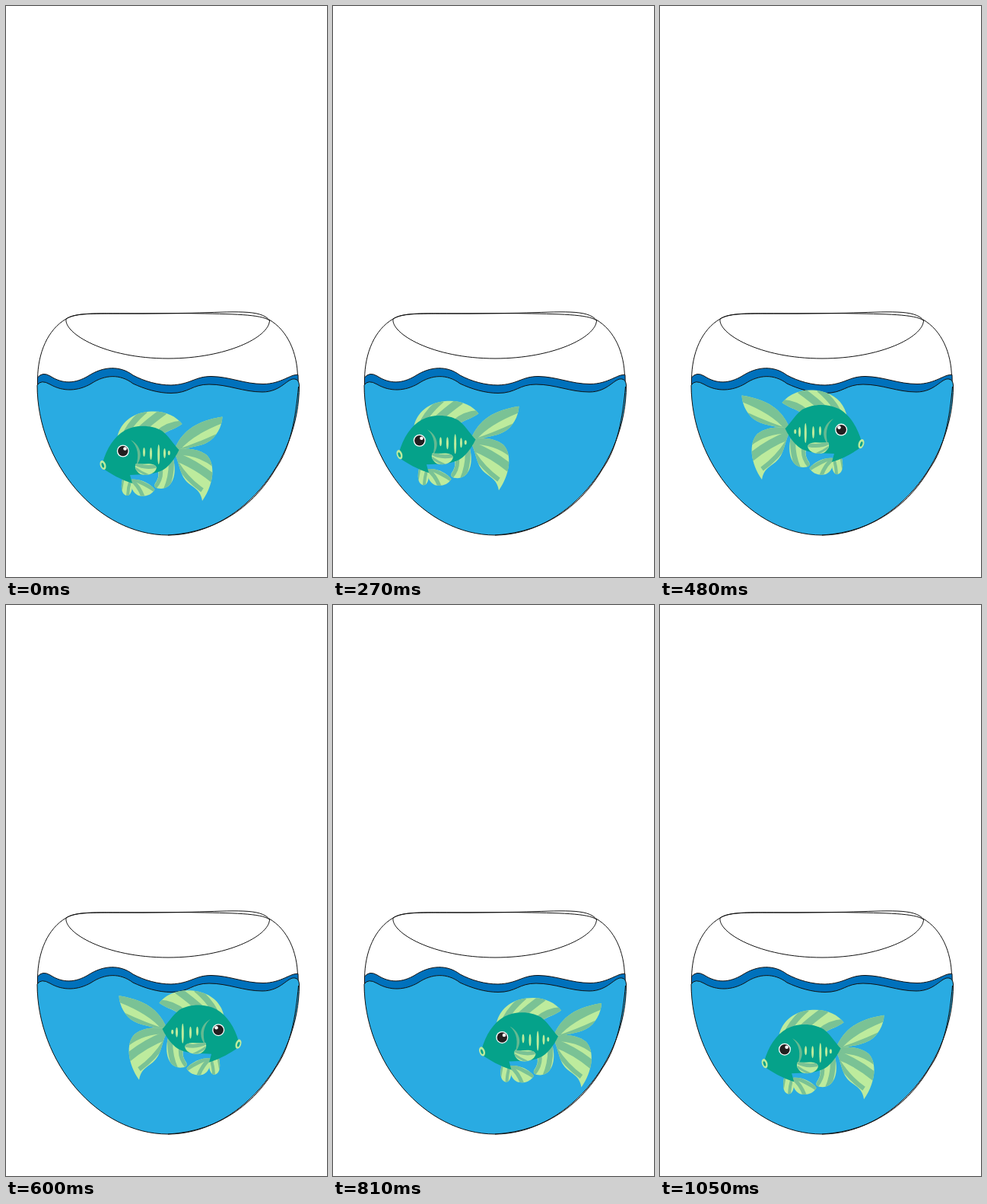
Write an HTML page that moves like this. It is 422 px wide and 750 px high and loops after 1080 ms.

```html
<!DOCTYPE html>
<html lang="en">
<head>
<meta charset="utf-8">
<title>Fish bowl</title>
<style>
  html, body { margin: 0; width: 100%; height: 100%; overflow: hidden; background: #fff; }
  svg { display: block; width: 100vw; height: 100vh; }
  .line { fill: none; stroke: #111; stroke-width: 1; }
  .body { fill: #05a28a; }
  .light { fill: #bdeb9d; }
  .stripe { fill: none; stroke: #7ac295; }
</style>
</head>
<body>
<svg viewBox="0 0 422 750">
  <defs>
    <path id="dorsal" d="M146 568C149 550 162 538 180 534C204 529 222 537 231.5 549C224 555 214 557 207 562L160 572Z"/>
    <path id="upper" d="M221 583C230 563 243 546 284.500 539.500C284 553 276 567 265 573C251 581 237 578 225 587Z"/>
    <path id="lower" d="M221 583C235 580 253 581 264 590C276 602 273 629 258 650C256 637 249 634 240 627C228 617 229 602 221 586Z"/>
    <path id="anal" d="M198 606C206 601 215 595 219 592C225 609 222 633 204 634C196 634 194 631 196 627C201 620 202 613 198 606Z"/>
    <path id="pelvic" d="M164 622C175 620 190 627 195.500 635C191 643 182 645 174 643C167 640 163 631 164 622Z"/>
    <path id="pelvicBack" d="M153 622L166 624C167 636 164 644 158 643C151 641 151 630 153 622Z"/>
    <path id="pectoral" d="M171 601C181 603 194 598 198 606C197 614 186 618 177 615C171 612 168 605 171 601Z"/>
  </defs>

  <!-- bowl and water -->
  <g class="line">
    <path d="M79 411C55 425 42 455 41.500 490M346 412C370 426 383 455 383.500 488"/>
    <path d="M79 411C76 430 130 463 213 463C290 463 346 435 346.500 413C335 405 300 404.500 240 403.700L140 404C110 404 90 404 79 411"/>
    <path d="M79 411C92 402 120 404 180 404L244 403.300C300 402 335 398 346.500 413"/>
    <path fill="#0071bc" d="M41.500 488Q48 480 58 486C75 497 91 496 108 486C128 473 150 472 167 485C182 493 200 498 217 498C243 497 248 486.500 270 486.500C295 487 313 496.500 338 496.500C362 496.500 374 483 384 484.500L384.500 510H41.500Z"/>
    <path fill="#29abe2" d="M41 498Q46 490 58 497C75 507 95 506 112 496C130 484 150 483 167 496C182 503 200 508.500 217 508.500C241 508.500 244 497 267 497C292 497 312 507 337 507C362 507 370 488 380 490Q385 491 385.500 498C386 600 305 695 213 695C120 695 41 600 41 498Z"/>
    <path d="M384.500 500C381 540 374 580 355 607C330 650 285 691 213 695"/>
  </g>

  <!-- fish, facing left, with its middle at 203.5, 585 -->
  <g id="fish">
    <g id="fins"></g>
    <path class="body" d="M127 600C132 582 142 565 157 557C171 550 191 550 205 558C214 565 219 574 227.500 583C222 595 213 607 203 611C192 616 178 615 163 616L166 627C151 622 138 615 127 607Z"/>
    <path d="M164 570C179 578 180 594 171 604C175 591 174 579 164 570Z" fill="#65ba91"/>
    <g id="front"></g>
    <g id="scales" class="light"></g>
    <ellipse class="light" cx="127.500" cy="603" rx="3.700" ry="6.300" transform="rotate(-18 127.500 603)"/>
    <ellipse class="body" cx="127.300" cy="603.300" rx="1.500" ry="3.400" transform="rotate(-18 127.300 603.300)"/>
    <circle cx="153.800" cy="584.500" r="8" fill="#fff"/>
    <circle cx="153.800" cy="584.500" r="6.700" fill="#231f20"/>
    <circle cx="156.500" cy="581.500" r="2.300" fill="#fff"/>
  </g>
</svg>
<script>
const byId = id => document.getElementById(id);

// Each fin is a light shape with darker bands clipped to it: [path, width].
function addFin(parent, name, ...bands) {
  const stripes = bands.map(([d, width]) => `<path class="stripe" d="${d}" stroke-width="${width}"/>`);
  parent.innerHTML += `<clipPath id="${name}Clip"><use href="#${name}"/></clipPath>
    <use href="#${name}" class="light"/><g clip-path="url(#${name}Clip)">${stripes.join('')}</g>`;
}

const fins = byId('fins'), front = byId('front');
addFin(fins, 'dorsal', ['M156 566Q161 550 183 531', 8], ['M178 556Q190 545 208 532', 10],
  ['M200 562Q214 549 236 549', 9]);
addFin(fins, 'upper', ['M222 578Q240 556 284 539', 17], ['M224 588Q250 580 280 566', 10]);
addFin(fins, 'lower', ['M220 583Q254 582 277 601', 13], ['M223 592Q250 602 274 622', 11],
  ['M224 600Q238 622 258 636', 6]);
addFin(fins, 'anal', ['M217 592Q219 616 210 636', 7], ['M203 606Q206 620 196 632', 5]);
addFin(fins, 'pelvicBack', ['M164 622Q160 633 160 645', 4], ['M154 621L151 638', 3]);
addFin(fins, 'pelvic', ['M164 622Q175 630 181 647', 5], ['M166 621Q182 627 197 637', 5]);
addFin(front, 'pectoral', ['M170 601Q182 608 199 604', 5], ['M170 607Q178 613 188 617', 3]);

// Scale marks: [x, centre y, half height].
byId('scales').innerHTML = [[181.5, 586, 6], [190.5, 588, 8], [200.7, 589, 13], [208.5, 587.5, 6.5], [214.3, 587, 3]]
  .map(([x, y, h]) => `<ellipse cx="${x}" cy="${y}" rx="1.5" ry="${h}"/>`).join('');

// Swim legs: start step, facing (1 left, -1 right), start point and speed per step.
const STEP = 30, LOOP = 1080;
const legs = [
  { start: 0, facing: 1, x: 203.5, y: 585, vx: -4.45, vy: -1.53 },
  { start: 12, facing: -1, x: 147.5, y: 555.5, vx: 10.25, vy: 0.4 },
  { start: 25, facing: 1, x: 286.6, y: 564.5, vx: -7.3, vy: 1.97 }
];

function draw(time) {
  const step = Math.floor((time % LOOP) / STEP);
  const leg = legs.findLast(item => item.start <= step);
  const n = step - leg.start;
  byId('fish').setAttribute('transform',
    `translate(${leg.x + leg.vx * n} ${leg.y + leg.vy * n}) scale(${leg.facing} 1) translate(-203.5 -585)`);
}

const began = performance.now();
function tick() {
  draw(performance.now() - began);
  requestAnimationFrame(tick);
}
draw(0);
requestAnimationFrame(tick);
</script>
</body>
</html>
```
